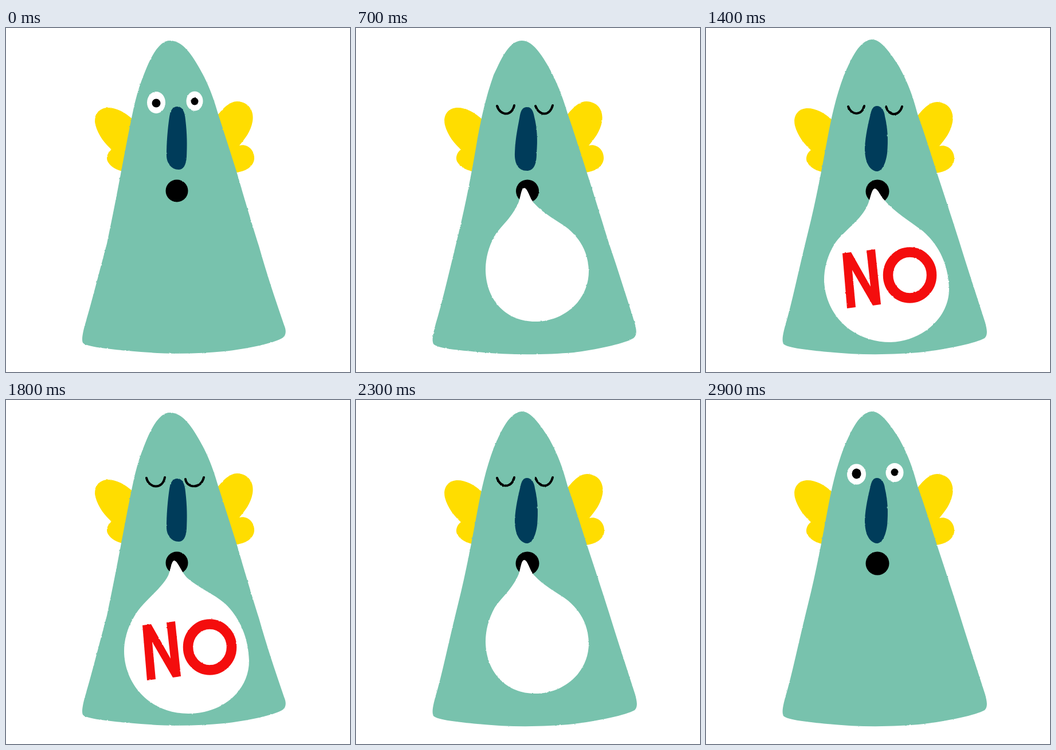
Animation of 600x600 px, one loop 3000 ms. Source, as an HTML page:

```html
<!DOCTYPE html>
<html lang="en">
<head>
<meta charset="utf-8">
<title>No</title>
<style>
  html, body { margin: 0; width: 100%; height: 100%; overflow: hidden; background: #fff; }
  svg { display: block; width: 100vw; height: 100vh; }
</style>
</head>
<body>
<svg id="stage" viewBox="0 0 600 600"></svg>
<script>
const STEP = 100, STEPS = 30;
const TEAL = '#78c2ad', YELLOW = '#ffdd00', NAVY = '#003c5a', RED = '#f40d0d';
const stage = document.getElementById('stage');

const path = (d, fill) => `<path d="${d}" fill="${fill}"/>`;
const line = (d, w) => `<path d="${d}" fill="none" stroke="#000" stroke-width="${w}" stroke-linecap="round"/>`;
const oval = (x, y, rx, ry, fill) => `<ellipse cx="${x}" cy="${y}" rx="${rx}" ry="${ry}" fill="${fill}"/>`;

// Three drawings of the figure, cycled for a hand-drawn wobble.
const poses = [
  {
    body: 'M286 22C262 22 246 67 236 93C225 122 219 158 212 192C203 238 192 300 176 376C162 428 148 484 137 520C133 536 132 544 134 549C140 556 180 560 212 563C270 569 330 569 380 564C420 560 470 549 483 540C490 534 488 525 485 518C470 474 455 430 441 380C430 345 415 295 402 250C390 212 379 178 370 150C358 107 345 83 335 66C318 36 303 22 286 22Z',
    nose: 'M299 137C308 137 312 147 313 160C316 185 316 205 315 225C314 240 309 247 301 247C288 247 280 235 280 222C280 200 282 175 285 155C287 143 291 137 299 137Z',
    mouth: [298, 284, 19.5, 19.5], wings: [0, 0, 0, 0],
    eyes: [[262, 130, 16, 19], [262, 131, 7.5, 7.5], [329, 127.5, 14.5, 17], [329, 128, 6.5, 6.5]],
    lids: 'M245 136C249 154 273 157 277 135M313 138C315 154 340 156 345 135'
  },
  {
    body: 'M289 22C264 22 249 65 240 82C226 122 219 155 212 192C204 240 193 300 178 362C162 428 149 484 139 516C134 536 132 544 135 551C142 559 180 562 212 565C270 571 330 570 380 566C420 561 470 550 484 541C491 535 489 526 486 514C472 470 457 422 441 375C430 340 415 290 402 250C390 212 379 178 370 152C358 112 348 90 336 68C320 40 306 22 289 22Z',
    nose: 'M298 138C306 138 309 144 311 155C316 175 317 195 315 218C315 240 309 249 298 249C284 249 276 238 277 217C278 190 283 170 286 152C288 143 291 138 298 138Z',
    mouth: [299, 284.5, 20, 20], wings: [-1, 0, -1, 0],
    eyes: [[262, 130, 16, 18.5], [262, 130, 8, 8], [329, 127, 15, 17], [329, 127, 6.5, 6.5]],
    lids: 'M246 136C252 154 272 154 276 135M313 136C320 154 338 154 343 135'
  },
  {
    body: 'M289 20C264 22 249 65 240 84C226 122 219 155 212 192C203 240 193 296 178 356C162 420 149 484 139 516C134 534 132 544 135 551C142 558 180 562 212 565C270 571 330 570 380 565C420 560 470 550 486 541C492 535 490 526 487 514C473 470 457 422 441 370C430 335 415 290 402 250C390 212 379 178 369 150C358 108 348 88 336 66C318 38 304 20 289 20Z',
    nose: 'M298 136C306 136 311 144 312 154C317 175 318 195 316 218C313 240 306 250 298 250C286 249 277 235 277 210C278 187 283 167 287 150C289 141 292 136 298 136Z',
    mouth: [299, 285, 20.5, 20.5], wings: [-1, 1, 0, 1],
    eyes: [[262.5, 129.5, 16.5, 18], [262.5, 128.5, 8, 9], [329, 126.5, 15.5, 16.5], [329, 126, 6.5, 6.5]],
    lids: 'M248 137C254 153 272 153 276 136M314 137C319 155 337 154 342 137'
  }
];

const leftWing = 'M222 160C207 146 190 138 176 139C158 141 153 156 156 169C161 188 173 202 184 212C176 218 174 228 178 234C184 243 192 247 203 250Z';
const rightWing = 'M366 156C378 140 390 128 403 128C424 129 433 145 430 163C427 181 416 194 407 205C420 201 434 212 433 228C432 242 417 251 400 252Z';

const bubbles = {
  small: 'M293 281C288 282 289 290 285 301C282 314 277 325 275 336C272 343 272 348 272 354C273 374 283 385 299 385C314 385 324 374 324 360C324 350 319 340 316 333C311 324 306 315 303 306C300 295 299 281 293 281Z',
  large: 'M293 279C288 281 288 290 284 303C273 330 254 344 242 362C231 382 226 402 226 422C227 478 265 512 312 512C364 512 406 474 406 424C405 390 390 367 370 350C352 336 328 325 311 306C303 298 300 279 293 279Z',
  fullA: 'M293 280C288 282 288 294 283 306C272 329 238 352 224 377C211 398 206 420 206 438C206 490 245 546 318 547C380 547 424 505 424 455C423 415 408 380 382 355C362 338 337 328 318 312C306 302 300 280 293 280Z',
  fullB: 'M294 280C289 282 288 291 283 306C272 335 238 355 224 377C211 398 206 420 206 440C208 500 255 548 322 548C378 546 424 505 424 455C423 415 408 380 378 354C354 336 330 322 311 300C304 293 300 280 294 280Z'
};

// Blend two paths that share the same commands.
function blend(a, b, k) {
  const to = b.match(/\d+/g);
  let i = 0;
  return a.replace(/\d+/g, n => (+n + (to[i++] - n) * k).toFixed(1));
}

const word =
  path('M238 393L253 391L287 451L280 388L295 386L305 482L291 484L255 422L261 487L246 489Z', RED) +
  `<ellipse cx="355.5" cy="431" rx="38" ry="40" fill="none" stroke="${RED}" stroke-width="17.5"/>`;

const sleepyEyes =
  path('M248 126C246 154 278 154 277 126Q262 133 248 126Z', '#fff') +
  path('M254 127C253 143 271 143 270 127Z', '#000') +
  line('M248 125Q262 133 277 125', 3) +
  path('M316 125C315 148 344 148 343 124Q328 130 316 125Z', '#fff') +
  path('M322 126C322 139 338 139 337 125Z', '#000') +
  line('M314 124C325 130 335 127 343 122', 3);

function eyes(pose, phase) {
  if (phase < 3) return pose.eyes.map((e, i) => oval(...e, i % 2 ? '#000' : '#fff')).join('');
  if (phase < 5) return sleepyEyes;
  return line(phase < 8 ? poses[1].lids : pose.lids, 4);
}

function bubble(phase, v) {
  if (phase < 3) return '';
  if (phase === 3) {
    return `<g transform="translate(293 281) scale(.5) translate(-293 -281)">${path(bubbles.small, '#fff')}</g>`;
  }
  if (phase < 8) return path(blend(bubbles.small, bubbles.large, (phase - 4) / 3), '#fff');
  return path(v ? bubbles.fullB : bubbles.fullA, '#fff') + word;
}

function draw(n) {
  const v = n % 3, pose = poses[v];
  const phase = Math.min(n, STEPS - n); // inflates, then the same steps back
  const [lx, ly, rx, ry] = pose.wings;
  return `<g filter="url(#rough${v})">` +
    `<g transform="translate(${lx} ${ly})">${path(leftWing, YELLOW)}</g>` +
    `<g transform="translate(${rx} ${ry})">${path(rightWing, YELLOW)}</g>` +
    path(pose.body, TEAL) + eyes(pose, phase) + path(pose.nose, NAVY) +
    oval(...pose.mouth, '#000') + bubble(phase, v) + '</g>';
}

const filters = poses.map((_, i) =>
  `<filter id="rough${i}" filterUnits="userSpaceOnUse" x="0" y="0" width="600" height="600" color-interpolation-filters="sRGB">
    <feTurbulence type="fractalNoise" baseFrequency=".2" numOctaves="2" seed="${i + 3}"/>
    <feDisplacementMap in="SourceGraphic" scale="2" xChannelSelector="R" yChannelSelector="G"/>
    <feGaussianBlur stdDeviation=".4"/>
  </filter>`).join('');
stage.innerHTML = `<defs>${filters}</defs><g id="scene"></g>`;
const scene = document.getElementById('scene');

const start = performance.now();
let shown = -1;
function tick(now) {
  const n = Math.floor(Math.max(0, now - start) / STEP) % STEPS;
  if (n !== shown) scene.innerHTML = draw(shown = n);
  requestAnimationFrame(tick);
}
tick(start);
</script>
</body>
</html>
```
